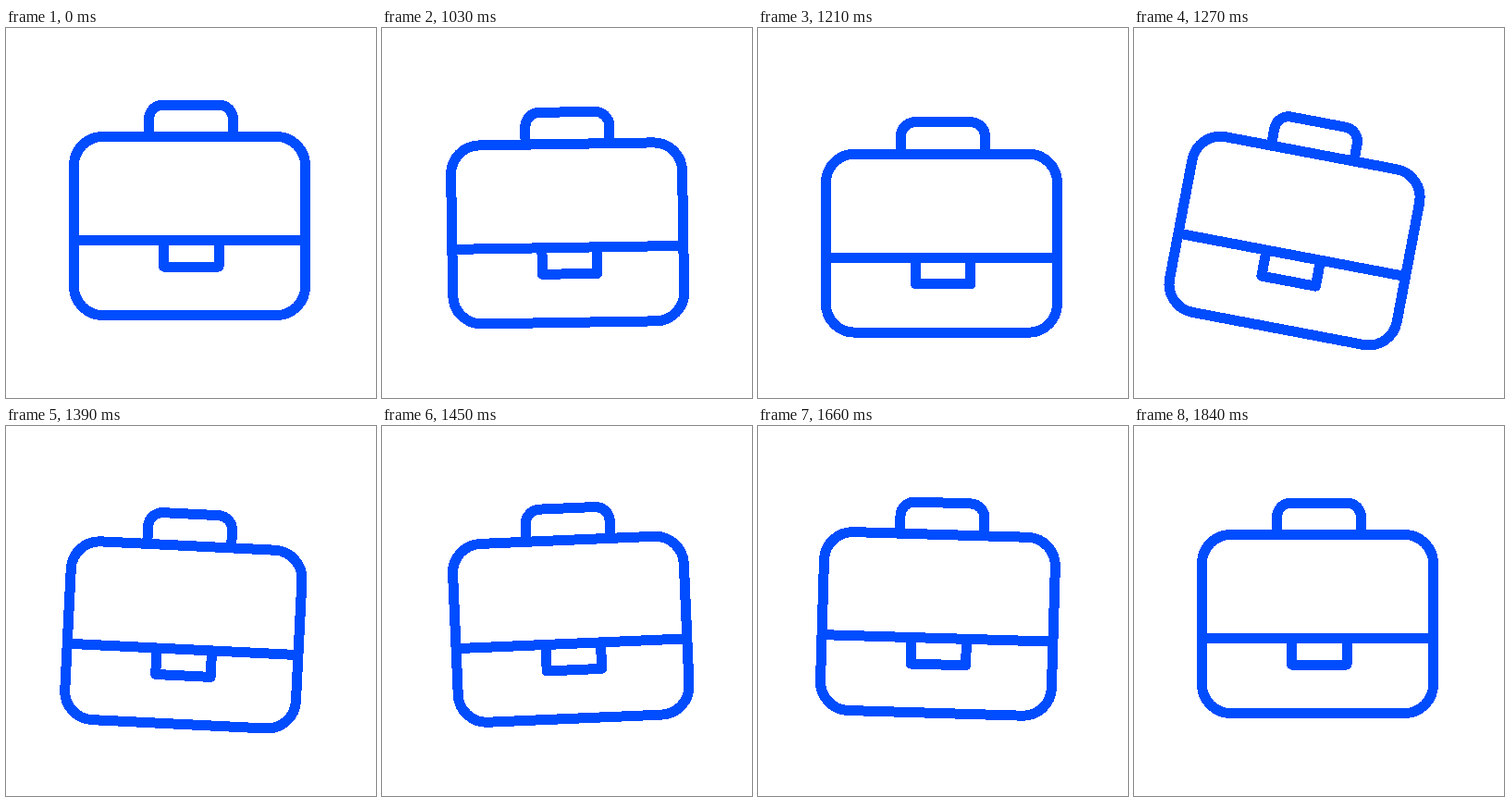
Write an HTML page that moves like this. It is 400 by 400 pixels and loops after 1870 ms.

```html
<!DOCTYPE html>
<html lang="en">
<head>
<meta charset="utf-8">
<title>Swinging briefcase</title>
<style>
  html, body { margin: 0; width: 100%; height: 100%; overflow: hidden; background: #fff; }
  svg { display: block; width: 100vw; height: 100vh; }
</style>
</head>
<body>
<svg viewBox="0 0 400 400">
  <g id="case" fill="none" stroke="#004cff" stroke-width="11" stroke-linejoin="round" shape-rendering="crispEdges">
    <rect x="73.5" y="117.5" width="250" height="193" rx="31"/>
    <path d="M73.5 229.5H323.5"/>
    <path d="M170.5 229.5V258H230V229.5"/>
    <path d="M154.5 117.5V98.5A15.5 15.5 0 0 1 170 83H230A15.5 15.5 0 0 1 245.5 98.5V117.5"/>
  </g>
</svg>
<script>
  const LOOP = 1870, HOLD = 1000, STEP = 30;
  const PIVOT = { x: 200, y: 80 };

  const sine = p => (1 - Math.cos(Math.PI * p)) / 2;
  const cubicOut = p => 1 - (1 - p) ** 3;

  // [time in ms, value, easing towards this key]
  const swing = [
    [HOLD, 0], [1145, -9, sine], [1285, 11.3, sine],
    [1473, -3, sine], [1617, 1.9, sine], [1840, 0, sine]
  ];
  const drop = [
    [HOLD, 0], [1180, 18.7, cubicOut], [1280, 18.7, sine], [1553, 0, sine]
  ];

  function valueAt(keys, t) {
    if (t <= keys[0][0]) return keys[0][1];
    for (let i = 1; i < keys.length; i++) {
      const [t0, v0] = keys[i - 1];
      const [t1, v1, ease] = keys[i];
      if (t < t1) return v0 + (v1 - v0) * ease((t - t0) / (t1 - t0));
    }
    return keys[keys.length - 1][1];
  }

  const bag = document.getElementById('case');
  const start = performance.now();

  function draw() {
    const raw = (performance.now() - start) % LOOP;
    const t = HOLD + Math.floor((raw - HOLD) / STEP) * STEP;
    const angle = valueAt(swing, t), dy = valueAt(drop, t);
    bag.setAttribute('transform',
      `translate(0 ${dy}) rotate(${angle} ${PIVOT.x} ${PIVOT.y})`);
    requestAnimationFrame(draw);
  }
  draw();
</script>
</body>
</html>
```
